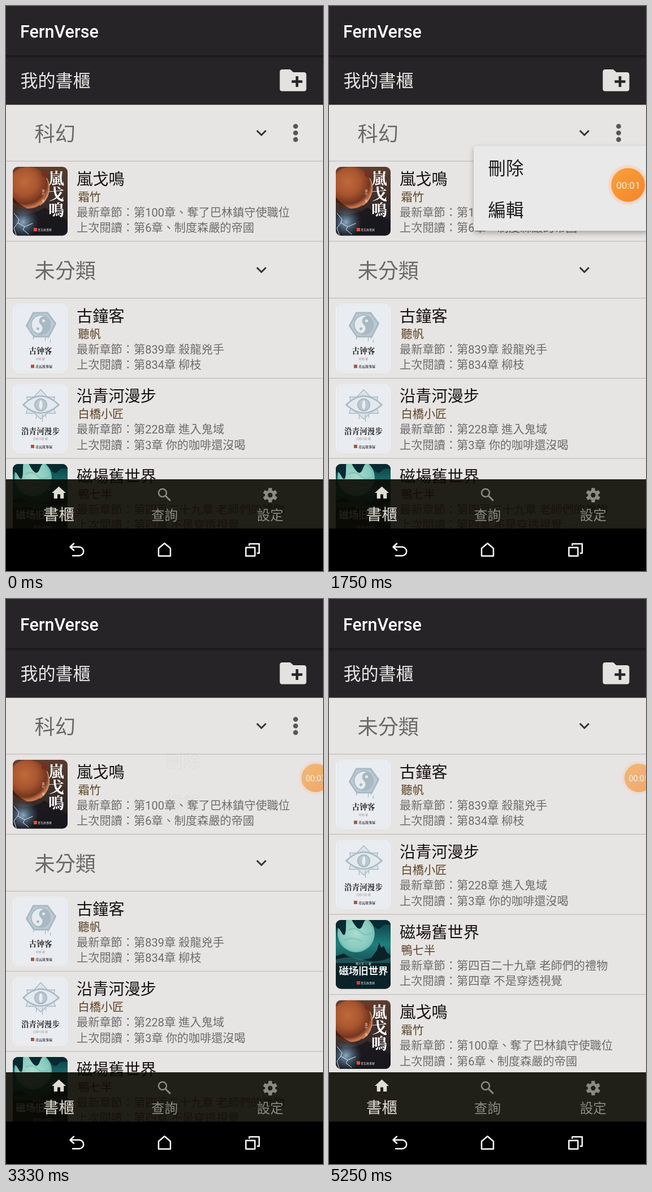
An HTML page that plays this animation: 561x998 px, repeating every 5760 ms.

```html
<!DOCTYPE html>
<html lang="zh-Hant">
<head>
<meta charset="utf-8">
<title>FernVerse</title>
<style>
html, body { margin: 0; width: 100%; height: 100%; overflow: hidden; background: #e6e5e3; }
svg { font-family: Roboto, "Noto Sans CJK TC", "Noto Sans CJK", sans-serif; }
#stage { display: block; width: 100vw; height: 100vh; }
.serif { font-family: "Noto Serif CJK SC", "Noto Serif CJK TC", "Noto Sans CJK SC", "Noto Sans CJK", serif; font-weight: 700; }
.mid { text-anchor: middle; }
.line { fill: none; stroke-linecap: round; stroke-linejoin: round; }

.ghost, .before, .after, .popup, .badge, .digits { animation: 5760ms step-end infinite; }
.ghost { animation-name: ghost; }
.before { animation-name: before; }
.after { animation-name: after; }
.popup { animation-name: popup; }
.badge { animation-name: badge; }
.digits { animation-name: digits; }

@keyframes ghost {
  0% { opacity: 1; }
  60.764% { opacity: .7; }
  62.153% { opacity: .3; }
  63.715%, 100% { opacity: 0; }
}
@keyframes before { 0% { opacity: 1; } 60.764%, 100% { opacity: 0; } }
@keyframes after { 0% { opacity: 0; } 60.764%, 100% { opacity: 1; } }
@keyframes popup {
  0% { opacity: 0; }
  23.09% { opacity: .1; }
  24.653% { opacity: .38; }
  26.042% { opacity: .75; }
  27.431% { opacity: 1; }
  55.035% { opacity: .7; }
  56.424% { opacity: .25; }
  57.813% { opacity: .02; }
  60.764%, 100% { opacity: 0; }
}
@keyframes badge {
  0% { opacity: 0; transform: translate(523px, 316px) scale(1); }
  1.389% { opacity: 1; transform: translate(523px, 316px) scale(1); }
  30.382% { opacity: 1; transform: translate(523px, 316px) scale(1); animation-timing-function: steps(4, jump-start); }
  36.111%, 100% { opacity: .58; transform: translate(548px, 316px) scale(.8); }
}
@keyframes digits {
  0% { transform: translateY(0); }
  18.75% { transform: translateY(-24px); }
  34.722% { transform: translateY(-48px); }
  55.035% { transform: translateY(-72px); }
  72.396% { transform: translateY(-96px); }
  91.146%, 100% { transform: translateY(-120px); }
}
</style>
</head>
<body>
<svg id="stage" viewBox="0 0 561 998">
  <defs>
    <clipPath id="card"><rect width="97" height="121.5" rx="9"/></clipPath>
    <radialGradient id="planet" cx=".42" cy=".36" r=".62">
      <stop offset="0" stop-color="#c2693c"/><stop offset=".5" stop-color="#a8552f"/>
      <stop offset=".85" stop-color="#74361f"/><stop offset="1" stop-color="#c9744a"/>
    </radialGradient>
    <linearGradient id="space" x2=".2" y2="1">
      <stop offset="0" stop-color="#6a4030"/><stop offset=".45" stop-color="#4a342c"/><stop offset="1" stop-color="#1d1e24"/>
    </linearGradient>
    <radialGradient id="spark">
      <stop offset="0" stop-color="#9cc4e2" stop-opacity=".85"/><stop offset="1" stop-color="#4a6a86" stop-opacity="0"/>
    </radialGradient>
    <linearGradient id="night" x2="0" y2="1">
      <stop offset="0" stop-color="#0b3a40"/><stop offset=".35" stop-color="#1f7f7c"/>
      <stop offset=".6" stop-color="#175558"/><stop offset="1" stop-color="#071218"/>
    </linearGradient>
    <radialGradient id="moon">
      <stop offset="0" stop-color="#a9dccf"/><stop offset=".85" stop-color="#86c9bd"/><stop offset="1" stop-color="#6cb8ae"/>
    </radialGradient>
    <linearGradient id="orange" x2="1" y2="1">
      <stop offset="0" stop-color="#f99a26"/><stop offset="1" stop-color="#f87814"/>
    </linearGradient>
    <linearGradient id="shade" x2="0" y2="1">
      <stop offset="0" stop-color="#000" stop-opacity=".35"/><stop offset="1" stop-color="#000" stop-opacity="0"/>
    </linearGradient>
    <filter id="lift" x="-10%" y="-15%" width="120%" height="140%">
      <feDropShadow dx="0" dy="4" stdDeviation="5" flood-opacity=".28"/>
    </filter>
  </defs>

  <rect width="561" height="998" fill="#e6e5e3"/>
  <g id="shelf"></g>

  <g id="topbar">
    <rect width="561" height="174.500" fill="#262426"/>
    <rect y="87" width="561" height="6" fill="url(#shade)"/>
    <text x="25" y="55.5" font-size="30.5" font-weight="500" fill="#fff">FernVerse</text>
    <text x="25.500" y="143" font-size="31" fill="#e9e8e6">我的書櫃</text>
    <path d="M489 112h14l5.500 5H527q4.500 0 4.500 4.500V146q0 4.500-4.500 4.500H489q-4.500 0-4.500-4.500V116.500q0-4.500 4.500-4.500z" fill="#e3e2df"/>
    <path d="M505.500 133.500h19M515 124v19" stroke="#262426" stroke-width="4.600"/>
  </g>

  <g id="tabs">
    <rect y="836" width="561" height="87" fill="#0a0902" fill-opacity=".9"/>
    <g fill="#e0ded2">
      <path transform="translate(78.500 845) scale(1.250)" d="M10 20v-6h4v6h5v-8h3L12 3 2 12h3v8z"/>
      <text class="mid" x="93.500" y="908" font-size="27.500">書櫃</text>
    </g>
    <g fill="#8b8a84" stroke="#8b8a84" stroke-width="0">
      <g class="line" stroke-width="2.500">
        <circle cx="277" cy="860" r="7"/>
        <path d="M282.500 865.500l7.500 7.500" stroke-width="3"/>
      </g>
      <text class="mid" x="280.500" y="907.500" font-size="23.500">查詢</text>
      <g id="gear" transform="translate(467.500 864)">
        <circle r="6.700" fill="none" stroke-width="5"/>
      </g>
      <text class="mid" x="467.500" y="907.500" font-size="23.500">設定</text>
    </g>
  </g>

  <g id="system">
    <rect y="923" width="561" height="75"/>
    <g class="line" stroke="#fff" stroke-width="2.500">
      <path d="M120 949.500l-6.500 6 6.500 6M114 955.500h15.500a7.700 7.700 0 0 1 0 15.500H118"/>
      <path d="M270 971.500V958l10.500-9 10.500 9v13.500z"/>
      <path d="M424.500 956.500h16v15h-16zM430.500 950h17.500v16.500h-3M430.500 950v2.500"/>
    </g>
  </g>

  <g class="popup">
    <rect x="256" y="247.500" width="309" height="149.500" rx="3" fill="#e9e9ea" filter="url(#lift)"/>
    <g font-size="31.500" fill="#1c1c1c">
      <text x="281.500" y="297.500">刪除</text>
      <text x="281.500" y="372">編輯</text>
    </g>
  </g>

  <g class="badge">
    <circle r="37" fill="#ffc6a4" fill-opacity=".5"/>
    <circle r="31.500" fill="url(#orange)"/>
    <g font-size="17.800" fill="#fff6ee">
      <text x="-22" y="7">00:0</text>
      <svg x="12" y="-11" width="12" height="24"><g class="digits" id="digits"></g></svg>
    </g>
  </g>
</svg>

<script>
const $ = id => document.getElementById(id);
const text = (x, y, size, fill, str, more = '') =>
  `<text x="${x}" y="${y}" font-size="${size}" fill="${fill}" ${more}>${str}</text>`;
const column = (x, y, step, size, fill, str, more = '') =>
  [...str].map((c, i) => text(x, y + i * step, size, fill, c, more)).join('');
const times = (n, fn) => Array.from({ length: n }, (_, i) => fn(i)).join('');

const mark = (color, ink) =>
  `<rect x="32" y="107.500" width="6" height="6" fill="${color}"/>` +
  text(40, 113, 6, ink, '青瓦故事屋', 'class="serif"');

function planetCover() {
  return `<rect width="97" height="122" fill="url(#space)"/>
    <circle cx="27" cy="37" r="37" fill="url(#planet)"/>
    <path d="M27 74A37 37 0 0 1-10 37Q4 66 27 74z" fill="#2a1410" opacity=".7"/>
    <path d="M60 20A37 37 0 0 1 48 68" fill="none" stroke="#f3b184" stroke-width="1.500" opacity=".8"/>
    <circle cx="56" cy="13" r="5" fill="#7c2d1c"/>
    <path d="M0 80q30 10 56-8l41 24v30H0z" fill="#14151b" opacity=".7"/>
    <circle cx="18" cy="98" r="28" fill="url(#spark)"/>
    <path d="M2 82l9 11-2 6 12 7-3 5 10 8M9 99l-7 9 4 12M21 106l14-6" class="line" stroke="#dcebf6" stroke-width="1"/>
    ${column(77, 31, 28, 28, '#fff', '嵐戈鳴', 'class="serif mid"')}
    ${column(54, 44, 6, 5, '#e8dcd4', '霜竹 著', 'class="mid"')}
    <rect x="37" y="108" width="6" height="6" fill="#d8582c"/>
    ${text(44, 113, 5, '#e4dcd8', '青瓦故事屋')}`;
}

function paleCover(title, author, emblem) {
  return `<rect width="97" height="122" rx="9" fill="#f0f1f2"/>
    <rect x="3" y="2" width="91.500" height="117.500" fill="#e9edf2" stroke="#dce1e7" stroke-width=".8"/>
    <g transform="translate(49.500 37)" fill="none" stroke="#a9b9c3" stroke-width="2">${emblem}</g>
    ${text(49, 88, 13.6, '#222', title, 'class="serif mid"')}
    ${text(49, 98.5, 5, '#999', author + ' 著', 'class="mid"')}
    ${mark('#a8583a', '#222')}`;
}

const bellEmblem = `
  <path d="M-25 2L-13-21H12L26-2 14 21H-12z" fill="#bccad3" stroke-width="3"/>
  <circle r="17" fill="#e6ebf0"/>
  <path d="M0-17A17 17 0 0 1 0 17A8.500 8.500 0 0 0 0 0A8.500 8.500 0 0 1 0-17z" fill="#a9b9c3" stroke="none" transform="rotate(40)"/>
  <circle cx="5" cy="-7" r="2.500" fill="#e6ebf0" stroke="none"/>
  <circle cx="-5" cy="7" r="2.500" fill="#a9b9c3" stroke="none"/>
  <path d="M-13 20v6M8 20v9M13 20v5M17 26v6" stroke-width="1.300"/>`;

const eyeEmblem = `
  <path d="M0-27L12-14 25-14 21 0 26 15H11L0 25-11 15H-26L-21 0-25-14-12-14z" stroke-width="1.300" fill="#dce3e9"/>
  <path d="M-31 0Q0-31 32 0Q0 29-31 0z" fill="#e3e9ee" stroke-width="2.500"/>
  <circle r="10.500" fill="#b9c7d0"/>
  <ellipse rx="3" ry="8" fill="#e9edf2" stroke="none"/>
  <path d="M-8 17v8M3 17v13M9 17v6" stroke-width="1.300"/>`;

function moonCover() {
  return `<rect width="97" height="122" fill="url(#night)"/>
    <circle cx="36" cy="24" r="33" fill="url(#moon)"/>
    <path d="M22 18q12-7 22 3t20 1M14 36q16-8 32 2" fill="none" stroke="#6fb9b0" stroke-width="3" opacity=".5"/>
    <path d="M0 0H97V9Q86 5 80 13T64 6 48 8 30 3 18 9 9 20 0 30z" fill="#062a2f"/>
    <path d="M0 64l14-5 9 6 22 6 18-4 10-14 4-13 3 9 5-3 5 11 7 5v60H0z" fill="#0a2228"/>
    <path d="M0 70q24-8 48 0t49-4v10H0z" fill="#3f9895" opacity=".4"/>
    ${text(49, 79, 5, '#dff', '鸭七半 ◎ 著', 'class="mid"')}
    ${text(49, 95.5, 17.4, '#f2f6f6', '磁场旧世界', 'class="mid" font-weight="700"')}
    <rect x="37" y="108" width="6" height="6" fill="#c8452c"/>
    ${text(44, 113, 5, '#ddd', '青瓦故事屋')}`;
}

const books = {
  planet: { title: '嵐戈鳴', author: '霜竹', latest: '第100章、奪了巴林鎮守使職位', last: '第6章、制度森嚴的帝國', cover: planetCover() },
  bell: { title: '古鐘客', author: '聽帆', latest: '第839章 殺龍兇手', last: '第834章 柳枝', cover: paleCover('古钟客', '听帆', bellEmblem) },
  eye: { title: '沿青河漫步', author: '白橋小匠', latest: '第228章 進入鬼域', last: '第3章 你的咖啡還沒喝', cover: paleCover('沿青河漫步', '白桥小匠', eyeEmblem) },
  moon: { title: '磁場舊世界', author: '鴨七半', latest: '第四百二十九章 老師們的禮物', last: '第四章 不是穿透視覺', cover: moonCover() }
};

const rule = y => `<rect y="${y - 0.7}" width="561" height="1.500" fill="#000" fill-opacity=".14"/>`;

function row(y, { title, author, latest, last, cover }) {
  return `<g transform="translate(0 ${y})">
    <g transform="translate(12 10)" clip-path="url(#card)">${cover}</g>
    ${text(125, 41.5, 28.2, '#16130f', title)}
    ${text(127.5, 70.5, 20.2, '#5e4124', author)}
    ${text(125, 97.5, 20.2, '#6d6c6a', '最新章節：' + latest)}
    ${text(125, 125, 20.2, '#6d6c6a', '上次閱讀：' + last)}
    ${rule(141.5)}</g>`;
}

// y is the middle of the group heading
const heading = (y, name) => text(50.5, y + 14.7, 36.2, '#6a6968', name) +
  `<path d="M444 ${y - 4.500}l8 8 8-8" fill="none" stroke="#333" stroke-width="3"/>` + rule(y + 49.5);

const dots = times(3, i => `<circle cx="512.500" cy="${212.500 + i * 11.700}" r="4.300" fill="#575655"/>`);
const rows = (top, names) => names.map((n, i) => row(top + i * 141.5, books[n])).join('');

$('shelf').innerHTML = `
  <g class="ghost">${heading(224.5, '科幻')}${dots}${row(274, books.planet)}</g>
  <g class="before">${heading(466.5, '未分類')}${rows(516, ['bell', 'eye', 'moon'])}</g>
  <g class="after">${heading(224.5, '未分類')}${rows(274, ['bell', 'eye', 'moon', 'planet'])}</g>`;

$('gear').innerHTML += times(6, i =>
  `<rect x="-3.200" y="-12.700" width="6.400" height="5.500" rx="1" transform="rotate(${i * 60})"/>`);
$('digits').innerHTML = times(6, i => `<text x="1" y="${18 + i * 24}">${i}</text>`);
</script>
</body>
</html>
```
